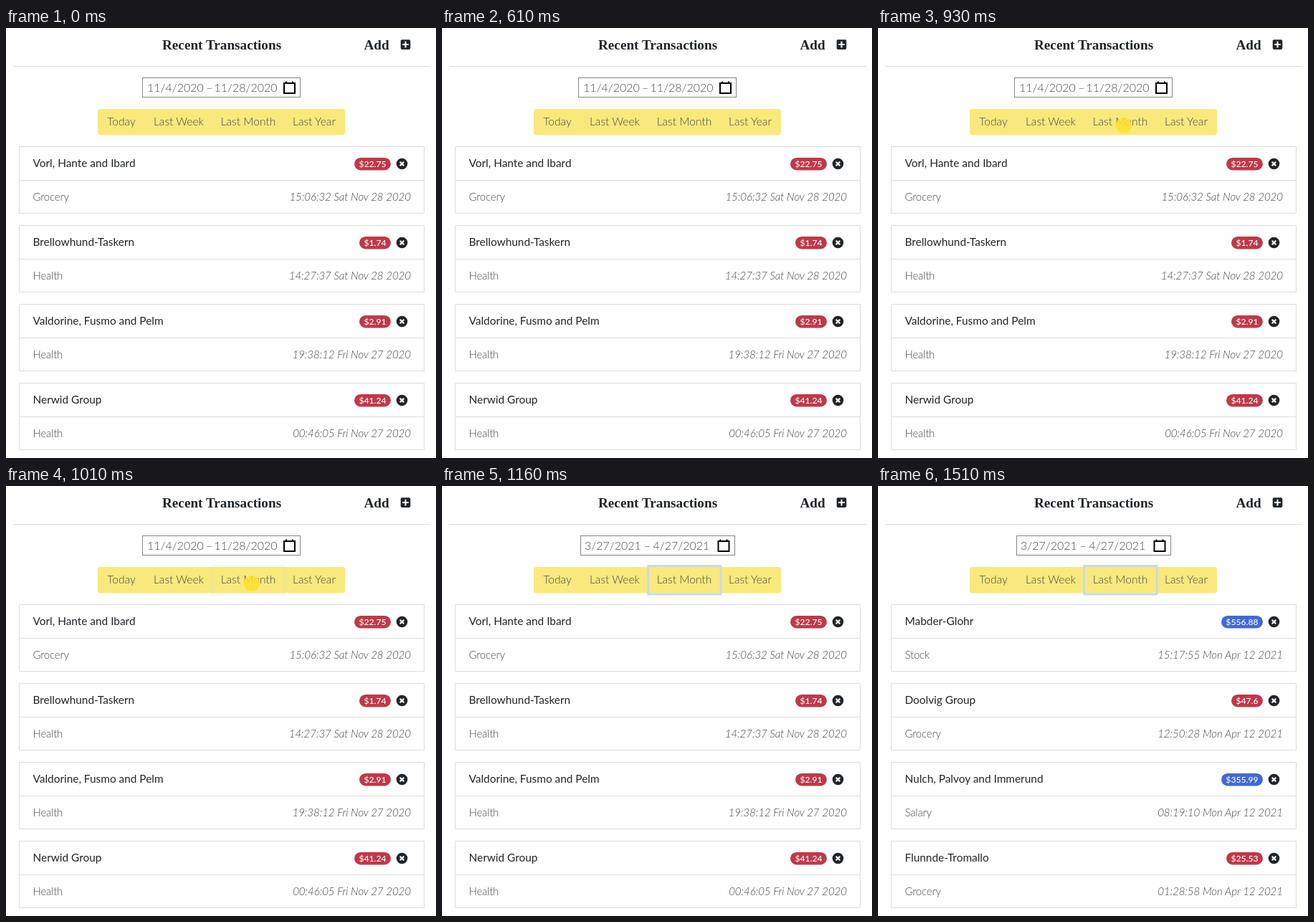
An HTML page for the animation above (2.05 s loop, 600x600 px).

```html
<!DOCTYPE html>
<html lang="en">
<head>
<meta charset="utf-8">
<title>Recent Transactions</title>
<style>
  html, body { margin: 0; width: 100%; height: 100%; overflow: hidden; background: #fff; }
  svg { display: block; width: 100vw; height: 100vh; }
  text { font-family: Lato, "Open Sans", sans-serif; font-size: 15.6px; fill: #212529; }
  .title { font: bold 19.2px "Liberation Serif", serif; }
  .light text, .range, .kind, .time { font-weight: 300; fill: #45484b; }
  .range { font-size: 16px; }
  .name { font-size: 15.4px; }
  .kind { font-size: 15px; letter-spacing: -.2px; }
  .time { font-size: 15.2px; font-style: italic; letter-spacing: -.12px; }
  .amount { font-size: 12.2px; font-weight: 500; fill: #fff; text-anchor: middle; }
  .line { fill: none; stroke: #dcdcdc; }
  .box { fill: none; stroke: #858585; }
  .red { fill: #bf394a; }

  .old-range, .new-range, .old-rows, .new-rows, .spot, .ring, .income {
    animation: 2050ms step-end infinite;
  }
  .old-range { animation-name: hide-range; }
  .new-range { animation-name: show-range; }
  .old-rows { animation-name: hide-rows; }
  .new-rows { animation-name: show-rows; }
  .spot { animation-name: spot; }
  .ring { animation-name: ring; }
  .income { animation-name: income; }

  @keyframes hide-range { 0% { opacity: 1 } 56.58%, 100% { opacity: 0 } }
  @keyframes show-range { 0% { opacity: 0 } 56.58%, 100% { opacity: 1 } }
  @keyframes hide-rows { 0% { opacity: 1 } 66.82%, 100% { opacity: 0 } }
  @keyframes show-rows { 0% { opacity: 0 } 66.82%, 100% { opacity: 1 } }
  @keyframes spot {
    0% { opacity: 0 } 41.46% { opacity: .88 } 52.68% { opacity: .45 } 56.58%, 100% { opacity: 0 }
  }
  @keyframes ring {
    0% { opacity: 0 } 49.26% { opacity: .2 } 52.68% { opacity: .6 } 56.58%, 100% { opacity: 1 }
  }
  @keyframes income {
    0% { fill: #bf394a } 70.24% { fill: #80518f } 73.65%, 100% { fill: #4169d6 }
  }
</style>
</head>
<body>
<svg viewBox="0 0 600 600">
  <defs>
    <g id="calendar" fill="none" stroke="#000" stroke-width="2">
      <path d="M1 3H16V17H1Z"/>
      <path d="M4 .5V3M13 .5V3"/>
    </g>
    <g id="remove">
      <circle r="7.8" fill="#212529"/>
      <path d="M-2.8-2.8L2.8 2.8M2.8-2.8L-2.8 2.8" stroke="#fff" stroke-width="2.3"/>
    </g>
  </defs>

  <text class="title" x="218" y="30">Recent Transactions</text>
  <text class="title" x="499.5" y="30">Add</text>
  <rect x="550.7" y="16.3" width="13.6" height="13.6" rx="1.8" fill="#212529"/>
  <path d="M553.2 23.1H561.8M557.5 18.8V27.4" stroke="#fff" stroke-width="2"/>
  <path class="line" d="M10 53.5H592"/>

  <g class="old-range">
    <rect class="box" x="190.5" y="69.5" width="220" height="27"/>
    <text class="range" y="89"><tspan x="197">11/4/2020</tspan> <tspan x="279">–</tspan> <tspan x="290.5">11/28/2020</tspan></text>
    <use href="#calendar" x="387" y="74"/>
  </g>
  <g class="new-range">
    <rect class="box" x="193.5" y="69.5" width="215" height="27"/>
    <text class="range" y="89"><tspan x="199">3/27/2021</tspan> <tspan x="281.5">–</tspan> <tspan x="294.5">4/27/2021</tspan></text>
    <use href="#calendar" x="384.5" y="74"/>
  </g>

  <rect x="128" y="113" width="345" height="36.5" rx="4" fill="#f9e97c"/>
  <rect class="ring" x="287.5" y="111.5" width="101.5" height="39.5" rx="1" fill="none" stroke="#c8daea" stroke-width="3"/>
  <g class="light" text-anchor="middle">
    <text x="161" y="136">Today</text>
    <text x="241" y="136">Last Week</text>
    <text x="338" y="136">Last Month</text>
    <text x="430" y="136">Last Year</text>
  </g>
  <circle class="spot" cx="343" cy="136" r="11" fill="#fde32f"/>

  <g id="cards"></g>
</svg>
<script>
  const before = [
    ["Vorl, Hante and Ibard", "$22.75", "Grocery", "15:06:32 Sat Nov 28 2020"],
    ["Brellowhund-Taskern", "$1.74", "Health", "14:27:37 Sat Nov 28 2020"],
    ["Valdorine, Fusmo and Pelm", "$2.91", "Health", "19:38:12 Fri Nov 27 2020"],
    ["Nerwid Group", "$41.24", "Health", "00:46:05 Fri Nov 27 2020"]
  ];
  const after = [
    ["Mabder-Glohr", "$556.88", "Stock", "15:17:55 Mon Apr 12 2021"],
    ["Doolvig Group", "$47.6", "Grocery", "12:50:28 Mon Apr 12 2021"],
    ["Nulch, Palvoy and Immerund", "$355.99", "Salary", "08:19:10 Mon Apr 12 2021"],
    ["Flunnde-Tromallo", "$25.53", "Grocery", "01:28:58 Mon Apr 12 2021"]
  ];
  const incomeKinds = ["Stock", "Salary"];
  const place = (i, body) => `<g transform="translate(0 ${i * 110})">${body}</g>`;

  const frame = (_, i) => place(i, `
    <path class="line" d="M18.5 165.5H583.5V258.5H18.5ZM18.5 212.5H583.5"/>
    <use href="#remove" x="552.5" y="189.5"/>`);

  const row = ([name, amount, kind, time], i) => {
    const width = 9 + 7 * amount.length;
    const tone = incomeKinds.includes(kind) ? "income" : "red";
    return place(i, `
      <text class="name" x="37.5" y="194">${name}</text>
      <rect class="${tone}" x="${537 - width}" y="181" width="${width}" height="17.4" rx="8.7"/>
      <text class="amount" x="${537 - width / 2}" y="194">${amount}</text>
      <text class="kind" x="37.5" y="241">${kind}</text>
      <text class="time" x="565" y="241" text-anchor="end">${time}</text>`);
  };

  document.getElementById("cards").innerHTML =
    before.map(frame).join("") +
    `<g class="old-rows">${before.map(row).join("")}</g>` +
    `<g class="new-rows">${after.map(row).join("")}</g>`;
</script>
</body>
</html>
```
